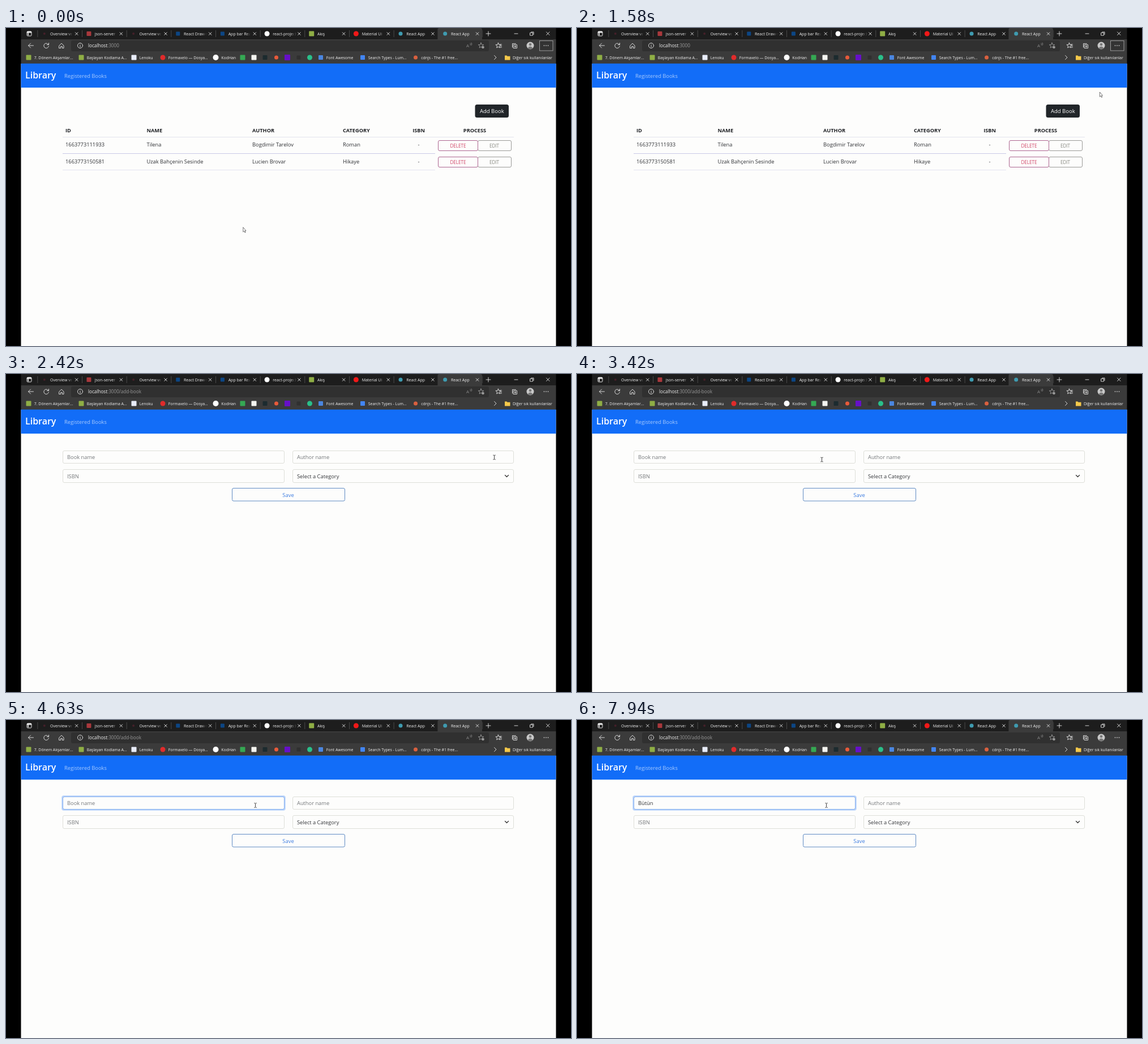
Animation, 998 px wide and 561 px high, one loop 7.99 s. Source, as an HTML page:

```html
<!DOCTYPE html>
<html lang="tr">
<head>
<meta charset="utf-8">
<title>Library</title>
<style>
html, body { margin: 0; width: 100%; height: 100%; overflow: hidden; background: #000; }
svg { display: block; width: 100%; height: 100%; }
text { font-family: "Open Sans", "Noto Sans", sans-serif; white-space: pre; }
.line { fill: none; stroke: #e8e8e8; stroke-width: .9; stroke-linecap: round; stroke-linejoin: round; }
</style>
</head>
<body>
<svg id="stage" viewBox="0 0 998 561" preserveAspectRatio="none"></svg>
<script>
const LOOP = 7990, OPEN_FORM = 2200, FOCUS = 3580, BLINK = 530;

// Pointer hot spot: time, x, y
const PATH = [
  [0, 418, 351], [560, 418, 351], [580, 416.5, 351], [720, 416.5, 351], [740, 418, 351], [860, 418, 351],
  [1050, 500, 328], [1250, 700, 225], [1430, 880, 130], [1580, 922.5, 112.5], [1740, 923, 113],
  [1900, 884, 135], [2050, 862.5, 147], [2560, 862.5, 147], [2750, 790, 172], [2950, 640, 187],
  [3150, 500, 165], [3310, 433, 152], [3420, 432.5, 151], [3580, 432.5, 151], [4000, 440.5, 150.5], [LOOP, 440.5, 150.5]
];
const KEYS = [[5080, 'B'], [5150, 'Bü'], [6310, 'Büt'], [6450, 'Bütü'], [6620, 'Bütün'], [6940, 'Bütün ']];

const text = (x, y, s, size, fill, extra = '') =>
  `<text x="${x}" y="${y}" font-size="${size}" fill="${fill}" ${extra}>${s}</text>`;
const rect = (x, y, w, h, fill, extra = '') =>
  `<rect x="${x}" y="${y}" width="${w}" height="${h}" fill="${fill}" ${extra}/>`;
const disc = (x, y, r, fill) => `<circle cx="${x}" cy="${y}" r="${r}" fill="${fill}"/>`;
const line = (d, extra = '') => `<path class="line" d="${d}" ${extra}/>`;
const box = (x, y, w, h, stroke, extra = '') =>
  rect(x + .5, y + .5, w - 1, h - 1, 'none', `rx="2.5" stroke="${stroke}" ${extra}`);
const band = (y, h, fill) => rect(26.5, y, 945, h, fill);
const icon = (x, y, [shape, fill, size]) => shape === 'o'
  ? disc(x, y, size / 2, fill)
  : rect(x - size / 2, y - size / 2, size, size, fill, 'rx="1"');
const MID = 'text-anchor="middle"';

function tabs() {
  const mui = ['s', '#0c4684', 7], react = ['o', '#3f9bb0', 7], docs = ['o', '#45202a', 4];
  const list = [
    ['Overview ve', docs], ['json-server', ['s', '#a8383c', 8]], ['Overview ve', docs],
    ['React Drawer', mui], ['App bar React', mui], ['react-project', ['o', '#fff', 9]],
    ['Akış', ['s', '#8fae45', 9]], ['Material Ui', ['o', '#f01818', 9]],
    ['React App', react], ['React App', react]
  ];
  return list.map(([name, mark], i) => {
    const x = 55.5 + i * 78.65, active = i === 9;
    return (active ? `<path d="M${x - 1} 20V3q0-3 3-3H838q3 0 3 3V20z" fill="#3b3b3b"/>` : rect(x, 4, .8, 12, '#555'))
      + icon(x + 12.3, 10, mark)
      + `<svg x="${x + 22}" y="0" width="41" height="20">${text(.6, 12.5, name, 7, '#f0f0f0')}`
      + rect(32, 0, 9, 20, `url(#fade${active ? 'On' : 'Off'})`) + '</svg>'
      + line(`M${x + 66.9} 7.8l4.6 4.6m0-4.6l-4.6 4.6`);
  }).join('');
}

function bookmarks() {
  const school = ['s', '#8fae45', 9];
  const list = [
    [40, school, '7. Dönem Akşamlar...'], [133, school, 'Başlayan Kodlama A...'],
    [226, ['s', '#e8ecfa', 9], 'Lenoku'], [277, ['o', '#e02b2b', 9], 'Formaxelo — Dosya...'],
    [370.5, ['o', '#fff', 10], 'KodHan'], [418, ['s', '#35a853', 9]], [438, ['s', '#f4f4f0', 9]],
    [457.5, ['s', '#1c2b2f', 8]], [477.5, ['o', '#e85a3a', 7]], [497, ['s', '#6610c8', 10]],
    [517, ['s', '#303030', 7]], [536.5, ['o', '#2ac08a', 9]], [556, ['s', '#4a86e0', 8], 'Font Awesome'],
    [630, ['s', '#4285f4', 8], 'Search Types - Lum...'], [723.5, ['o', '#d9603f', 7], 'cdnjs - The #1 free...']
  ];
  return list.map(([x, mark, name]) =>
    icon(x, 52, mark) + (name ? text(x + 9.8, 54.6, name, 6.9, '#f0f0f0') : '')).join('')
    + line('M862.5 48.5l3.5 3.5l-3.5 3.5')
    + '<path d="M881 48.5h3.5l1 1.3h5v6.7h-9.5z" fill="#f4c84a"/>'
    + text(895, 54.6, 'Diğer sık kullanılanlar', 7, '#f0f0f0');
}

function star(x, y, r) {
  const pts = Array.from({ length: 10 }, (_, i) => {
    const a = i * Math.PI / 5 - Math.PI / 2, k = i % 2 ? r * .45 : r;
    return `${(x + k * Math.cos(a)).toFixed(1)} ${(y + k * Math.sin(a)).toFixed(1)}`;
  });
  return `M${pts.join('L')}z`;
}

function browser() {
  return band(0, 20, '#1d1d1d') + band(20, 43, '#3b3b3b') + tabs()
    + rect(37, 6, 8, 8, 'none', 'rx="1.5" stroke="#eee"') + rect(37, 6, 8, 2.5, '#eee') + rect(38.5, 8, 1.5, 5, '#eee')
    + line('M848 10h8m-4-4v8') + rect(841.5, 4, .7, 12, '#444')
    + line('M898 10h6M926 8.5h4.5v4.5h-4.5zM927.5 7h4.5v4.5M954.5 7l5.5 5.5m0-5.5l-5.5 5.5')
    + rect(115, 22, 738, 19, '#303030', 'rx="3"')
    + line('M48.5 31h-9m4-4l-4 4l4 4M74.8 29a4.3 4.3 0 1 0 .6 3M75.5 26.5v3h-3M94 31l4-4l4 4v4.5h-2.7v-3h-2.6v3H94z')
    + '<circle class="line" cx="131" cy="31" r="4.5"/>' + line('M131 30.5v3M131 28.7v.1')
    + text(813, 34, 'A', 8, '#888') + line('M820 27q1.5 1 0 3M822 26q2 2 0 4.5', 'style="stroke:#888"')
    + line(star(839, 31, 5), 'style="stroke:#999"') + disc(842.5, 34, 2.3, '#999')
    + line(star(869.5, 31, 4.8) + 'M872.5 29h3m-2 2.5h2m-2.5 2.5h2.5')
    + line('M894.5 34v-6.5h6M896.5 29.5h6v6h-6zM899.5 31v3m-1.5-1.5h3')
    + disc(926, 31, 6.5, '#c9c9c9') + disc(926, 29, 2.3, '#777') + '<path d="M921.5 35.5q4.5-6 9 0q-4.5 4-9 0z" fill="#777"/>'
    + `<g id="menuFocus">${rect(942.5, 22.5, 23.5, 17.5, '#333', 'stroke="#9a9a9a"')}</g>`
    + [950.5, 954, 957.5].map(x => disc(x, 31, .8, '#fff')).join('')
    + '<text x="145" y="34.2" font-size="8.15" fill="#f4f4f4">localhost<tspan fill="#999">:3000</tspan><tspan id="route" fill="#999"></tspan></text>'
    + bookmarks();
}

function bookList() {
  const ink = '#2e3034';
  const heads = [[105, 'ID'], [248.5, 'NAME'], [435, 'AUTHOR'], [595, 'CATEGORY'], [729, 'ISBN', MID], [828, 'PROCESS', MID]];
  const books = [
    ['1663773111933', 'Tilena', 'Bogdimir Tarelov', 'Roman'],
    ['1663773150581', 'Uzak Bahçenin Sesinde', 'Lucien Brovar', 'Hikaye']
  ];
  const row = (book, i) => {
    const y = 29.4 * i;
    return book.map((s, c) => text(heads[c][0], 209.3 + y, s, 9.3, ink)).join('') + text(729, 209.3 + y, '-', 9.3, ink, MID)
      + rect(100, Math.round(221 + y), 658, 1, i ? '#e3e4f0' : '#c9c9e6')
      + `<g transform="translate(0 ${Math.round(y)})">` + box(833, 198, 60, 19, '#9a9a98') + box(763, 198, 71, 19, '#ad6591')
      + text(798.5, 211, 'DELETE', 8.1, '#cf3f64', MID) + text(862.5, 211, 'EDIT', 8.1, '#85867f', MID) + '</g>';
  };
  return rect(828.5, 135, 59.5, 23, '#212529', 'rx="3.5"') + text(858.3, 150.3, 'Add Book', 9.5, '#fff', MID)
    + heads.map(([x, s, at = '']) => text(x, 184, s, 9.2, '#1e2024', `font-weight="700" ${at}`)).join('')
    + rect(100, 192, 797, 1, '#e3e4ee') + books.map(row).join('');
}

function bookForm() {
  const soft = '#dedfd9', hint = '#75787b';
  return box(100, 135, 392, 23, soft) + box(506, 135, 391, 23, soft) + box(100, 168, 392, 24, soft) + box(506, 168, 391, 24, soft)
    + `<g id="ring">${box(99, 134, 394, 25, '#b9d3fb', 'stroke-width="2.5"')}${box(100, 135, 392, 23, '#86b0ee')}</g>`
    + `<g id="hint">${text(108, 150.3, 'Book name', 9.3, hint)}</g>` + text(514, 150.3, 'Author name', 9.3, hint)
    + text(108, 183.8, 'ISBN', 9.3, hint) + text(514, 183.8, 'Select a Category', 9.3, '#34363a')
    + line('M881.5 178.5l3 3l3-3', 'style="stroke:#333;stroke-width:1.3"')
    + box(399, 201, 200, 23.5, '#5f8bc4') + text(498.5, 216.5, 'Save', 9.4, '#3b7be0', MID)
    + '<text id="typed" x="108" y="150.3" font-size="9.3" fill="#2c2e32"></text>'
    + rect(0, 140, .9, 12.5, '#222', 'id="caret"');
}

const fade = (id, color) => `<linearGradient id="${id}"><stop stop-color="${color}" stop-opacity="0"/><stop offset=".85" stop-color="${color}"/></linearGradient>`;

const pointers = `<g id="pointer">
  <path id="arrow" d="M.8 .5V8.8L2.7 7.1L4 10L5.2 9.5L4 6.6H6z" fill="#fff" stroke="#555" stroke-width=".8"/>
  <path id="beam" d="M-2.2 -3.8H-.6L0 -3.2L.6 -3.8H2.2M0 -3.2V3.2M-2.2 3.8H-.6L0 3.2L.6 3.8H2.2" fill="none" stroke="#444" stroke-width="1"/>
  <path id="hand" d="M-.8 6V.7q.8-1.4 1.6 0V4l3.7 .8q1 .4 .8 1.8L4.5 10.5H0L-3.2 6.7q.4-1.3 2.4 .6z" fill="#fff" stroke="#555" stroke-width=".8"/>
</g>`;

document.getElementById('stage').innerHTML = `<defs>${fade('fadeOff', '#1d1d1d')}${fade('fadeOn', '#3b3b3b')}</defs>`
  + rect(0, 0, 998, 561, '#000') + band(63, 498, '#fdfdfc') + browser()
  + band(62.7, 42.5, '#126df8') + text(34, 88.6, 'Library', 16, '#fff', 'font-weight="600"')
  + text(103, 88.2, 'Registered Books', 9.3, '#a9cbfd')
  + `<g id="list">${bookList()}</g><g id="form">${bookForm()}</g>` + pointers;

const el = id => document.getElementById(id);
const show = (id, on) => { el(id).style.display = on ? '' : 'none'; };
const within = (x, y, l, t, r, b) => x >= l && x <= r && y >= t && y <= b;

function pointerAt(t) {
  const i = Math.max(1, PATH.findIndex(p => p[0] > t));
  const [a, b] = [PATH[i - 1], PATH[i]], k = (t - a[0]) / (b[0] - a[0]);
  return [a[1] + (b[1] - a[1]) * k, a[2] + (b[2] - a[2]) * k];
}

function render(t) {
  const form = t >= OPEN_FORM, [x, y] = pointerAt(t);
  show('list', !form);
  show('form', form);
  show('menuFocus', !form);
  el('route').textContent = form ? '/add-book' : '';

  const inField = form && (within(x, y, 100, 135, 492, 158) || within(x, y, 506, 135, 897, 158));
  const onButton = !form && within(x, y, 828, 135, 888, 158);
  show('beam', inField);
  show('hand', onButton);
  show('arrow', !inField && !onButton);
  el('pointer').setAttribute('transform', `translate(${x.toFixed(2)} ${y.toFixed(2)})`);

  const [keyTime, value] = KEYS.filter(k => k[0] <= t).pop() || [FOCUS, ''];
  el('typed').textContent = value;
  show('hint', !value);
  el('ring').style.opacity = Math.min(1, Math.max(0, (t - FOCUS) / 150));
  show('caret', t >= FOCUS && Math.floor((t - keyTime) / BLINK) % 2 === 0);
  el('caret').setAttribute('x', 108.2 + (form && value ? el('typed').getComputedTextLength() : 0));
}

const start = performance.now();
function tick() {
  render((performance.now() - start) % LOOP);
  requestAnimationFrame(tick);
}
tick();
</script>
</body>
</html>
```
